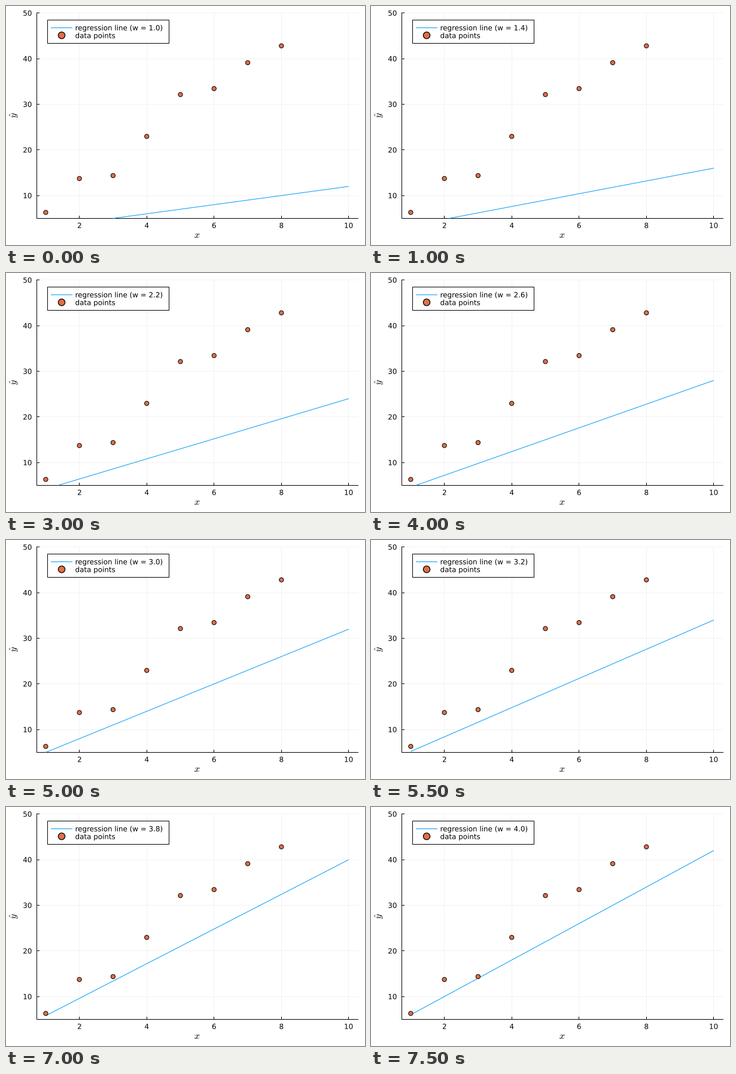
Write a matplotlib script that moves like this. It is 600 px wide and 400 px high and loops after 8 s.

```python
import matplotlib.pyplot as plt
from matplotlib.animation import FuncAnimation
from matplotlib.patches import Circle, PathPatch, Rectangle
from matplotlib.textpath import TextPath
from matplotlib.transforms import Affine2D

plt.rcParams.update({"font.family": "DejaVu Sans", "mathtext.fontset": "cm"})

W, H, DPI = 600, 400, 100
PT = 72 / DPI  # points per pixel
BLUE, ORANGE, GRID = "#009afa", "#e26f46", "#f2f2f2"
LEFT, RIGHT, TOP, BOTTOM = 51, 588, 11, 355
FRAMES, INTERVAL = 16, 500
FONT_SIZE = 11.9
DATA = [6.3, 13.73, 14.37, 22.96, 32.13, 33.44, 39.12, 42.81]


def px(x):
    return 66.4 + 56.27 * (x - 1)


def py(y):
    return 355.4 - 7.636 * (y - 5)


fig = plt.figure(figsize=(W / DPI, H / DPI), dpi=DPI, facecolor="white")
ax = fig.add_axes([0, 0, 1, 1])
ax.set_xlim(0, W)
ax.set_ylim(H, 0)
ax.axis("off")


def stroke(x0, y0, x1, y1, color="black", z=2):
    """Crisp line from one whole pixel to another, both included."""
    ax.plot([x0, x1], [y0, y1], color=color, lw=PT, zorder=z,
            solid_capstyle="projecting")


def glyphs(s, size=FONT_SIZE):
    return TextPath((0, 0), s, size=size)


def add_text(path, x, y):
    flip = Affine2D().scale(1, -1).translate(x, y)
    patch = PathPatch(path, fc="black", lw=0, zorder=6,
                      transform=flip + ax.transData)
    return ax.add_patch(patch)


def label(s, x, y, align=0.5, size=FONT_SIZE):
    """Text with its ink aligned at x: 0 left, 0.5 centre, 1 right."""
    path = glyphs(s, size)
    box = path.get_extents()
    add_text(path, x - box.x0 - align * box.width, y)


def dot(x, y, r, lw, z):
    ax.add_patch(Circle((x, y), r, fc=ORANGE, ec="black", lw=lw * PT, zorder=z))


# Grid, ticks and tick labels
for v in range(2, 11, 2):
    x = int(px(v))
    stroke(x, TOP, x, BOTTOM, GRID, 1)
    stroke(x, BOTTOM, x, BOTTOM - 4)
    label(str(v), px(v), 371.5)
for v in range(10, 51, 10):
    y = int(py(v))
    stroke(LEFT, y, RIGHT, y, GRID, 1)
    stroke(LEFT, y, LEFT + 4, y)
    label(str(v), 42.6, py(v) + 4.4, 1)

# Axes and their names
stroke(LEFT, TOP, LEFT, BOTTOM)
stroke(LEFT, BOTTOM, RIGHT, BOTTOM)
label("$x$", 319.3, 388, size=16)
y_name = glyphs(r"$\hat{y}$", 16).transformed(Affine2D().rotate_deg(90))
box = y_name.get_extents()
add_text(y_name, 12.3 - (box.x0 + box.x1) / 2, 183.3 + (box.y0 + box.y1) / 2)

# Series
line = ax.plot([], [], color=BLUE, lw=PT, zorder=3, solid_capstyle="butt")[0]
for i, v in enumerate(DATA):
    dot(px(i + 1), py(v), 3.6, 1, 4)

# Legend
ax.add_patch(Rectangle((69, 23), 203, 39, fc="white", ec="black",
                       lw=PT, zorder=5))
stroke(75, 36, 110, 36, BLUE, 6)
dot(93, 49.1, 5.6, 1.3, 6)
title = add_text(glyphs("regression line"), 115.6, 40.7)
add_text(glyphs("data points"), 115.6, 53.7)


def update(i):
    w = 1 + 0.2 * i
    x0 = max(1, 3 / w)  # the line starts where it enters the plot at y = 5
    line.set_data([px(x0), px(10)], [py(2 + w * x0), py(2 + w * 10)])
    title.set_path(glyphs(f"regression line (w = {w:.1f})"))
    return line, title


anim = FuncAnimation(fig, update, frames=FRAMES, interval=INTERVAL,
                     repeat=True, repeat_delay=0)
plt.show()
```
